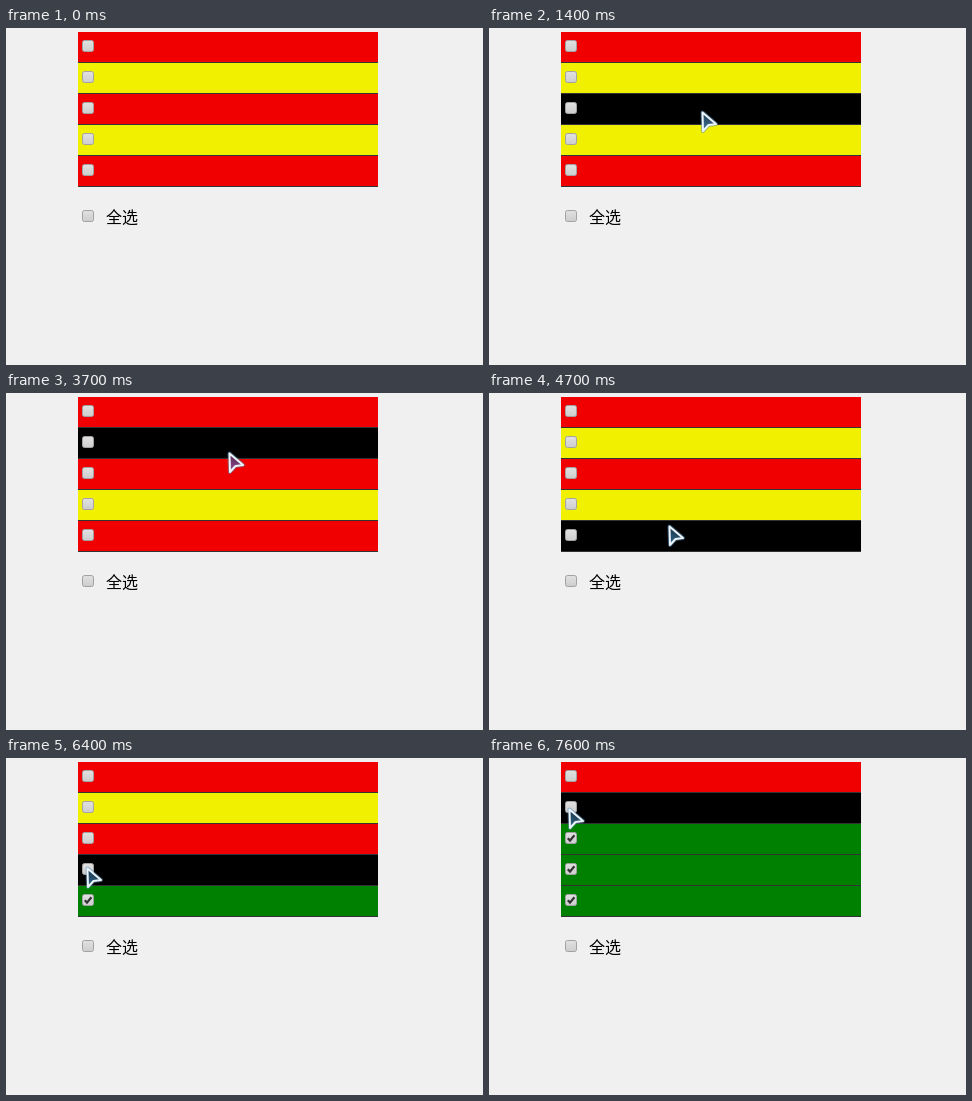
An HTML page with a canvas that plays this animation: 477x337 px, repeating every 8000 ms.

```html
<!DOCTYPE html>
<html lang="zh">
<head>
<meta charset="utf-8">
<style>
html, body { margin: 0; width: 100%; height: 100%; overflow: hidden; background: #f0f0f0; }
canvas { display: block; }
</style>
</head>
<body>
<canvas id="stage" width="477" height="337"></canvas>
<script>
const ctx = document.getElementById('stage').getContext('2d');
const LOOP = 8000, STEP = 100;
const LEFT = 72, TOP = 4, WIDTH = 300, PITCH = 31, ROWS = 5;
const RED = '#f00000', YELLOW = '#f0f000', GREEN = '#008000';

// Pointer stops: time, x, y of the tip
const path = [
  [100, 387, 233], [600, 222, 139], [700, 222, 139],
  [1100, 218, 110], [1300, 218, 110], [1400, 212, 83],
  [1600, 212, 76], [1700, 212, 76], [2000, 213, 55], [2100, 213, 55],
  [2600, 218, 25], [2900, 218, 25], [3100, 218, 31], [3200, 218, 31],
  [3500, 220, 48], [3600, 220, 48], [3700, 222, 59],
  [3900, 222, 73], [4000, 222, 73], [4500, 205, 107], [4600, 205, 107],
  [4700, 179, 132], [5100, 130, 146], [5500, 80, 139], [5900, 80, 139],
  [6400, 80, 109], [6800, 80, 108], [7100, 80, 79], [7200, 80, 78], [7600, 79, 50]
];

// Pointer tint: time, red, green, blue
const tints = [
  [100, 62, 112, 150], [1400, 62, 112, 150], [2600, 105, 180, 110],
  [3100, 105, 180, 110], [3700, 150, 75, 145], [4700, 48, 98, 135]
];

// Moment at which each row gets ticked
const tickAt = [Infinity, Infinity, 7200, 6800, 5900];

function sample(keys, t) {
  let i = 0;
  while (i < keys.length - 1 && keys[i + 1][0] <= t) i++;
  const a = keys[i], b = keys[i + 1] || a;
  const k = b === a ? 0 : Math.max(0, (t - a[0]) / (b[0] - a[0]));
  return a.slice(1).map((v, j) => v + (b[j + 1] - v) * k);
}

function polyline(points) {
  ctx.beginPath();
  points.forEach(([x, y]) => ctx.lineTo(x, y));
}

function checkbox(y, ticked) {
  const x = LEFT + 4;
  const fill = ctx.createLinearGradient(0, y, 0, y + 12);
  fill.addColorStop(0, '#e2e2e2');
  fill.addColorStop(1, '#cccccc');
  ctx.beginPath();
  ctx.roundRect(x + 0.5, y + 0.5, 11, 11, 2);
  ctx.fillStyle = fill;
  ctx.fill();
  ctx.lineWidth = 1;
  ctx.strokeStyle = '#a2a2a2';
  ctx.stroke();
  if (!ticked) return;
  polyline([[x + 2.8, y + 6.2], [x + 5, y + 8.6], [x + 9.4, y + 3.2]]);
  ctx.lineWidth = 2.2;
  ctx.strokeStyle = '#333333';
  ctx.stroke();
}

function pointer(x, y, tint) {
  ctx.save();
  ctx.translate(Math.round(x), Math.round(y));
  ctx.lineJoin = 'round';
  polyline([[1.5, 1.5], [15, 13], [7.5, 14], [2, 20]]);
  ctx.closePath();
  ctx.lineWidth = 4;
  ctx.strokeStyle = 'rgba(90, 140, 180, 0.55)';
  ctx.stroke();
  const fill = ctx.createLinearGradient(9, 4, 3, 18);
  fill.addColorStop(0, `rgb(${tint.map(v => Math.round(v * 0.55))})`);
  fill.addColorStop(1, `rgb(${tint.map(Math.round)})`);
  ctx.fillStyle = fill;
  ctx.fill();
  ctx.lineWidth = 2;
  ctx.strokeStyle = '#eaf4fa';
  ctx.stroke();
  ctx.restore();
}

function draw(t) {
  const shown = t >= path[0][0];
  const [px, py] = sample(path, t);
  const inside = shown && px >= LEFT && px < LEFT + WIDTH;
  const hover = inside ? Math.floor((py - TOP) / PITCH) : -1;

  ctx.fillStyle = '#f0f0f0';
  ctx.fillRect(0, 0, 477, 337);

  for (let i = 0; i < ROWS; i++) {
    const y = TOP + i * PITCH, ticked = t >= tickAt[i];
    ctx.fillStyle = ticked ? GREEN : i === hover ? '#000000' : i % 2 ? YELLOW : RED;
    ctx.fillRect(LEFT, y, WIDTH, PITCH);
    ctx.fillStyle = '#333333';
    ctx.fillRect(LEFT, y + PITCH - 1, WIDTH, 1);
    checkbox(y + 8, ticked);
  }

  checkbox(182, false);
  ctx.fillStyle = '#000000';
  ctx.font = '16px "Noto Sans CJK SC", "Noto Sans CJK", sans-serif';
  ctx.fillText('全选', 100, 195);

  if (shown) pointer(px, py, sample(tints, t));
}

function frame() {
  draw(Math.floor((performance.now() % LOOP) / STEP) * STEP);
  requestAnimationFrame(frame);
}
frame();
</script>
</body>
</html>
```
